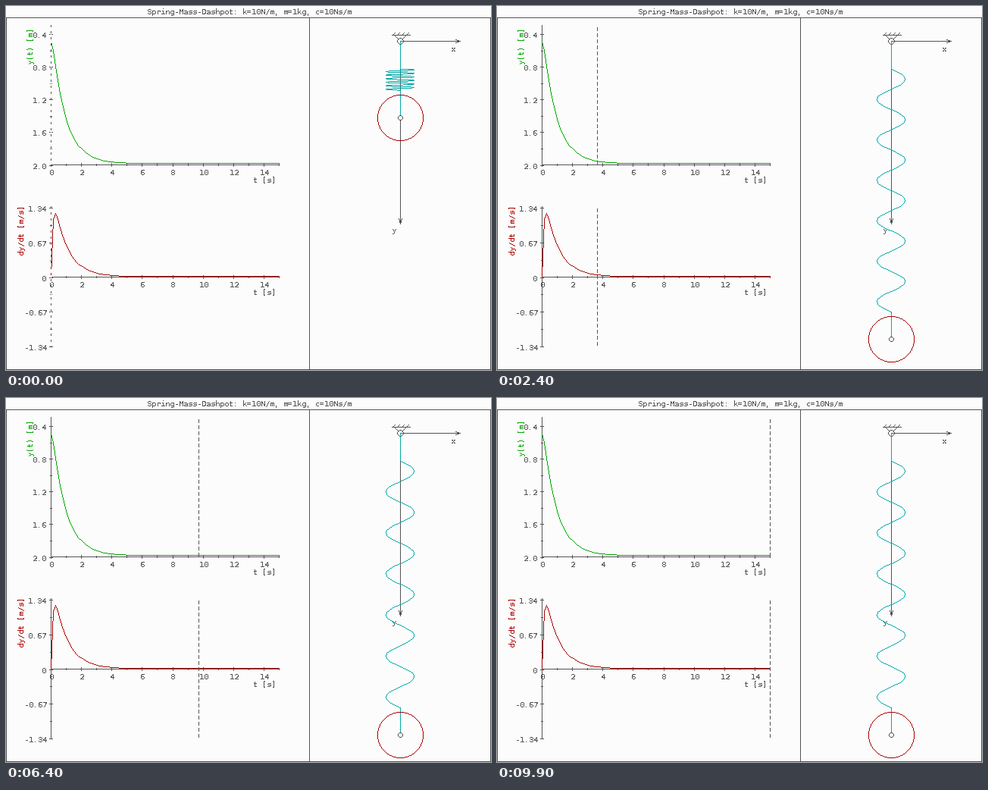
Recreate the animation shown at these times as a matplotlib script. Size 640 by 480 pixels, loop 10 s.

```python
import numpy as np
import matplotlib.pyplot as plt
from matplotlib.animation import FuncAnimation
from matplotlib.patches import Circle

plt.rcParams.update({
    "font.family": "DejaVu Sans Mono",
    "text.antialiased": False,
    "text.hinting": "native",
    "text.hinting_factor": 1,
    "path.simplify": False,
    "toolbar": "None",
})

W, H, DPI = 640, 480, 80
PX = 72 / DPI                      # points per pixel
FRAMES, LOOP, T_END = 100, 10000, 15

BG, INK = "#fcfcfc", "#545454"
GREEN, RED, TEAL = "#00a800", "#a80000", "#00a8a8"

# Overdamped spring-mass-dashpot released from rest
K, M, C, G, REST, Y0 = 10, 1, 10, 9.81, 1.0, 0.5
Y_EQ = REST + M * G / K
ROOT = np.sqrt((C / (2 * M)) ** 2 - K / M)
S1, S2 = -C / (2 * M) + ROOT, -C / (2 * M) - ROOT
A = (Y0 - Y_EQ) * S2 / (S2 - S1)
B = (Y0 - Y_EQ) - A


def position(t):
    return Y_EQ + A * np.exp(S1 * t) + B * np.exp(S2 * t)


def velocity(t):
    return A * S1 * np.exp(S1 * t) + B * S2 * np.exp(S2 * t)


fig = plt.figure(figsize=(W / DPI, H / DPI), dpi=DPI, facecolor=BG)
ax = fig.add_axes([0, 0, 1, 1])
ax.set_xlim(-0.5, W - 0.5)         # whole numbers are pixel centres
ax.set_ylim(H - 0.5, -0.5)
ax.axis("off")


def raster(xs, ys):
    """Whole-pixel points of a polyline, one per step of its longer side."""
    pts = np.floor(np.column_stack([xs, ys]))
    runs = [pts[:1]]
    for p, q in zip(pts[:-1], pts[1:]):
        n = int(abs(q - p).max())
        if n:
            runs.append(np.floor(np.linspace(p, q, n + 1)[1:] + 0.5))
    return np.vstack(runs).T


def circle_points(r):
    a = np.arange(-int(r * 0.7072), int(r * 0.7072) + 1)
    b = np.floor(np.sqrt(r * r - a * a) + 0.5)
    return np.r_[a, a, b, -b], np.r_[b, -b, a, a]


def dots(x, y):
    """Data for a path that fills exactly the given pixels."""
    x, y = np.asarray(x, float), np.asarray(y, float)
    gap = np.full(len(x), np.nan)
    return (np.column_stack([x - 0.1, x + 0.1, gap]).ravel(),
            np.column_stack([y, y, gap]).ravel())


def paint(x, y, color=INK, z=2):
    return ax.plot(*dots(x, y), color=color, lw=0.4 * PX, zorder=z,
                   antialiased=False, snap=False,
                   solid_capstyle="projecting")[0]


def line(xs, ys, color=INK):
    return paint(*raster(xs, ys), color)


def label(x, y, s, ha="left", color=INK, **kw):
    kw.setdefault("va", "baseline")
    ax.text(x, y + 0.5, s, ha=ha, color=color, fontsize=10 * PX, **kw)


# Plot geometry
X0, X1 = 59, 360
PX_S = (X1 - X0) / T_END
times = np.linspace(0, T_END, FRAMES)
curve_x = X0 + 0.5 + PX_S * times


def time_axis(y):
    line([X0, X1], [y, y])
    for s in range(T_END + 1):
        x, size = round(X0 + PX_S * s), 2 - s % 2
        line([x, x], [y - size, y + size])
        if s % 2 == 0:
            label(x, y + 13, str(s), "center")
    label(326, y + 23, "t [s]")


def value_axis(top, first, last, bottom, names):
    line([X0, X0], [top, bottom])
    for i, y in enumerate(np.linspace(first, last, 2 * len(names) - 1)):
        y, size = round(y), 2 - i % 2
        line([X0 - size, X0 + size], [y, y])
        if i % 2 == 0:
            label(53, y + 4, names[i // 2], "right")


# Panels and title
line([0, 639, 639, 0, 0], [15, 15, 479, 479, 15])
line([400, 400], [15, 479])
label(185, 10, "Spring-Mass-Dashpot: k=10N/m, m=1kg, c=10Ns/m")

# Position plot
value_axis(25, 37, 209.6, 209, ["0.4", "0.8", "1.2", "1.6", "2.0"])
time_axis(209)
label(33, 52, "y(t) [m]", "center", GREEN, rotation=90, va="center")
line(curve_x, 209.8 - (2 - position(times)) * 108, GREEN)

# Velocity plot
value_axis(264, 266, 449, 449, ["1.34", "0.67", "0", "-0.67", "-1.34"])
time_axis(357)
label(21, 295, "dy/dt [m/s]", "center", RED, rotation=90, va="center")
line(curve_x, 356.8 - velocity(times) * 67.5, RED)

# Support and coordinate arrows
CX, CY, SCALE = 520, 46, 201
line([509, 533], [38, 38])
for x in (510, 516, 522, 528):
    line([x, x + 3], [38, 35])
line([513, 517], [39, 43])
line([527, 523], [39, 43])
ring_x, ring_y = circle_points(4)
paint(CX + ring_x, CY + ring_y)
line([CX, 599], [CY, CY])
line([593, 599, 593], [44, CY, 48])
line([CX, CX], [CY, 287])
line([518, CX, 522], [280, 287, 280])
label(590, 59, "x", "center")
label(512, 298, "y", "center")

# Moving parts
rows = np.r_[28:210, 267:448]
rows = rows[np.where(rows < 240, rows - 28, rows - 267) % 8 < 5]
cursor = paint([], [], z=3)
spring = paint([], [], TEAL, z=3)
mass = paint([], [], RED, z=4)
hub = ax.add_patch(Circle((CX, CY), 2.2, fc=BG, lw=0, antialiased=False,
                          zorder=4))
pin = paint([], [], z=5)
mass_x, mass_y = circle_points(30)
pin_x, pin_y = circle_points(3)

LEAD, COILS, AMP = 37, 6, 18.5
phase = np.linspace(0, 1, 97)
coil_x = CX + AMP * np.sin(2 * np.pi * COILS * phase)


def update(i):
    t = T_END * i / (FRAMES - 1)
    x = np.floor(X0 + PX_S * t + 0.5)
    cursor.set_data(*dots(np.full(len(rows), x), rows))
    cursor.set_color(INK if i else BG)   # inverts over the axis itself

    y = np.floor(CY + SCALE * position(t) + 0.5)
    top, end = CY + LEAD, y - LEAD + 1
    coil_y = top + (end - top) * phase
    spring.set_data(*dots(*raster(np.r_[CX, coil_x, CX],
                                  np.r_[CY, coil_y, y])))
    mass.set_data(*dots(CX + mass_x, y + mass_y))
    pin.set_data(*dots(CX + pin_x, y + pin_y))
    hub.center = (CX, y)
    return [cursor, spring, mass, hub, pin]


anim = FuncAnimation(fig, update, frames=FRAMES, interval=LOOP / FRAMES,
                     repeat=True, repeat_delay=0)
plt.show()
```
